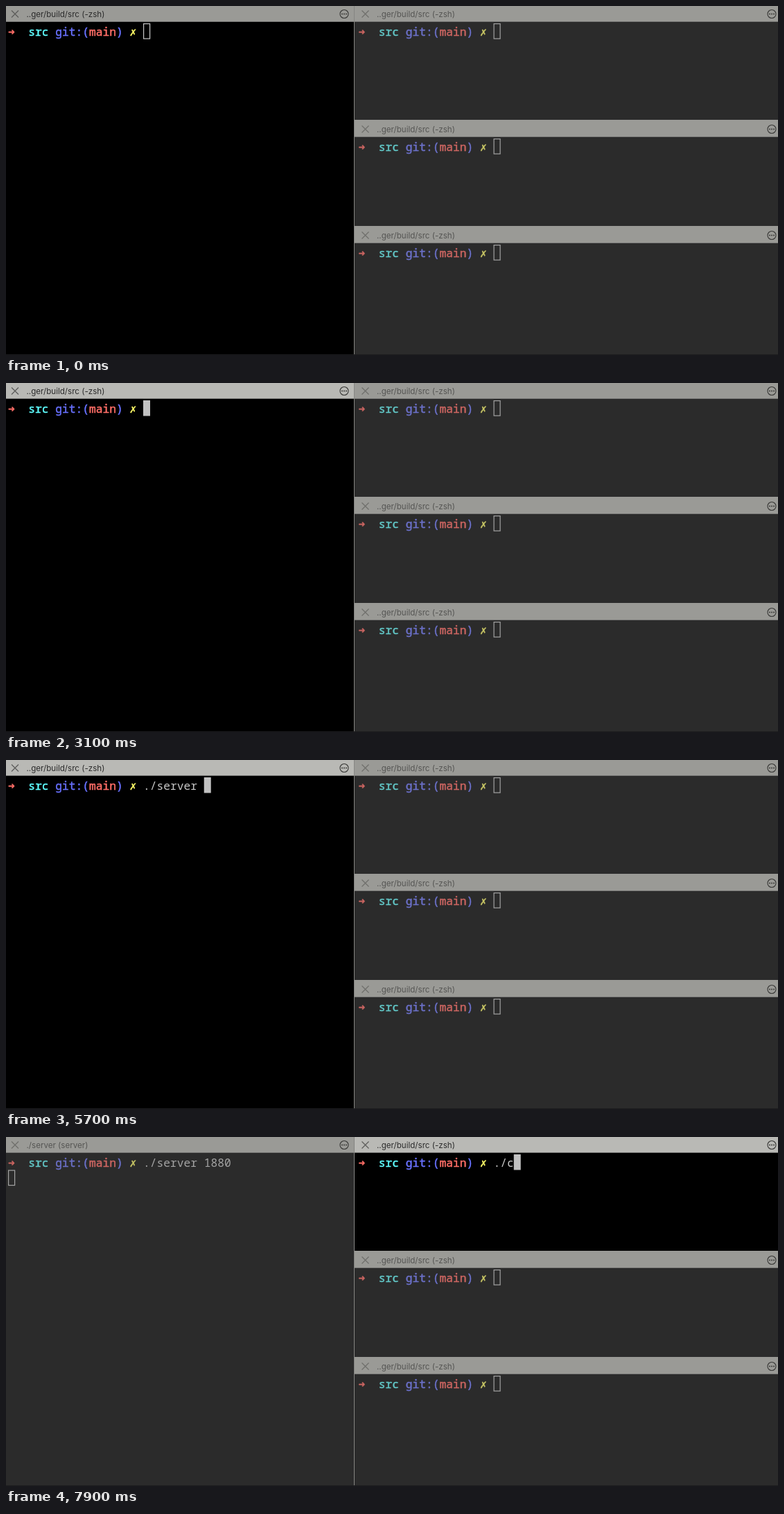
Write an HTML page with a canvas that moves like this. It is 1114 by 503 pixels and loops after 8000 ms.

```html
<!DOCTYPE html>
<html lang="en">
<head>
<meta charset="utf-8">
<title>Terminal panes</title>
<style>
  html, body { margin: 0; width: 100%; height: 100%; overflow: hidden; background: #000; }
  canvas { display: block; }
</style>
</head>
<body>
<canvas id="stage" width="1114" height="503"></canvas>
<script>
const ctx = document.getElementById('stage').getContext('2d');

const LOOP = 8000;
const ACTIVATE = 2900;   // window gains focus
const ENTER = 6700;      // server command is run
const SWITCH = 6900;     // focus moves to the top right pane
const CELL = 9.75, ROW = 22.5;

const MONO = '16.25px "Noto Sans Mono", "DejaVu Sans Mono", monospace';
const DINGBATS = '16.2px "DejaVu Sans Mono", "DejaVu Sans", monospace';
const TITLE = '11.6px Inter, "Liberation Sans", sans-serif';

const BRIGHT = { bg: '#000', red: '#ff6e67', cyan: '#5ffdff', blue: '#6871ff', yellow: '#fffc67', text: '#c7c7c7', title: '#2b2b2b', cross: '#5c5c5a' };
const DIM = { bg: '#2b2b2b', red: '#cb6561', cyan: '#62c6c6', blue: '#6b70c8', yellow: '#c7c564', text: '#a3a3a3', title: '#555553', cross: '#6e6e6b' };

const PANES = [
  { x: 0, y: 0, w: 502, h: 503, inset: 3, icon: 488 },
  { x: 503, y: 0, w: 611, h: 164, inset: 5.5, icon: 1105 },
  { x: 503, y: 166, w: 611, h: 151, inset: 5.5, icon: 1105 },
  { x: 503, y: 319, w: 611, h: 184, inset: 5.5, icon: 1105 }
];

const SERVER_CMD = './server 1880';
const SERVER_KEYS = [4400, 4600, 4750, 4900, 5050, 5200, 5300, 5450, 5650, 5850, 6000, 6100, 6300];
const CLIENT_CMD = './c';
const CLIENT_KEYS = [7500, 7700, 7900];

const typed = (cmd, keys, t) => cmd.slice(0, keys.filter(k => k <= t).length);

function rect(x, y, w, h, color) {
  ctx.fillStyle = color;
  ctx.fillRect(x, y, w, h);
}

function write(str, x, y, font, color, weight = 0) {
  ctx.font = font;
  ctx.fillStyle = color;
  ctx.fillText(str, x, y);
  if (weight) {
    ctx.strokeStyle = color;
    ctx.lineWidth = weight;
    ctx.strokeText(str, x, y);
  }
}

function header(pane, title, colors, lit) {
  const { x, y, w, icon } = pane;
  const cy = y + 11.5, cx = x + (x ? 15.5 : 13);
  const top = y ? y - 2 : 0;
  rect(x, top, w, y + 22 - top, lit ? '#b9b9b5' : '#9a9a96');
  rect(x, y + 22, w, 1, '#777775');

  ctx.strokeStyle = colors.cross;
  ctx.lineWidth = 1.2;
  ctx.beginPath();
  ctx.moveTo(cx - 5, cy - 5);
  ctx.lineTo(cx + 5, cy + 5);
  ctx.moveTo(cx + 5, cy - 5);
  ctx.lineTo(cx - 5, cy + 5);
  ctx.stroke();

  write(title, x + (x ? 32 : 29.5), y + 15.5, TITLE, colors.title);

  ctx.strokeStyle = ctx.fillStyle = '#373735';
  ctx.lineWidth = 1.1;
  ctx.beginPath();
  ctx.arc(icon, cy, 6, 0, Math.PI * 2);
  ctx.stroke();
  for (const dx of [-3, 0, 3]) {
    ctx.beginPath();
    ctx.arc(icon + dx, cy, 0.95, 0, Math.PI * 2);
    ctx.fill();
  }
}

function cursor(x, y, solid, color) {
  if (solid) return rect(x, y, 10, 22.5, '#c1c1c1');
  ctx.strokeStyle = color;
  ctx.lineWidth = 1.2;
  ctx.strokeRect(x + 0.6, y + 0.6, 9, 21.5);
}

function drawPane(pane, { title, command, ran, focused, windowActive }) {
  const colors = focused ? BRIGHT : DIM;
  const left = pane.x + pane.inset, base = pane.y + 43;
  const col = n => left + n * CELL;

  rect(pane.x, pane.y, pane.w, pane.h, colors.bg);
  header(pane, title, colors, focused && windowActive);

  write('➜', col(0), base - 0.5, DINGBATS, colors.red, 0.3);
  write('src', col(3), base, MONO, colors.cyan, 0.5);
  write('git:(', col(7), base, MONO, colors.blue, 0.5);
  write('main', col(12), base, MONO, colors.red, 0.5);
  write(')', col(16), base, MONO, colors.blue, 0.5);
  write('✗', col(18), base, DINGBATS, colors.yellow, 0.3);
  write(command, col(20), base, MONO, colors.text);

  const cursorX = ran ? left : col(20 + command.length);
  cursor(cursorX, pane.y + 25 + (ran ? ROW : 0), focused && windowActive, colors.text);
}

function render(t) {
  const ran = t >= ENTER;
  const current = t < SWITCH ? 0 : 1;
  const idle = '..ger/build/src (-zsh)';
  const serverTitle = !ran ? idle : t < SWITCH ? './server (-zsh)' : './server (server)';
  const commands = [typed(SERVER_CMD, SERVER_KEYS, t), typed(CLIENT_CMD, CLIENT_KEYS, t), '', ''];

  PANES.forEach((pane, i) => drawPane(pane, {
    title: i ? idle : serverTitle,
    command: commands[i],
    ran: i === 0 && ran,
    focused: i === current,
    windowActive: t >= ACTIVATE
  }));
  rect(502, 0, 1, 503, '#858583');
  rect(0, 502, 1114, 1, '#1c1c1e');
}

function tick() {
  render(performance.now() % LOOP);
  requestAnimationFrame(tick);
}
tick();
</script>
</body>
</html>
```
